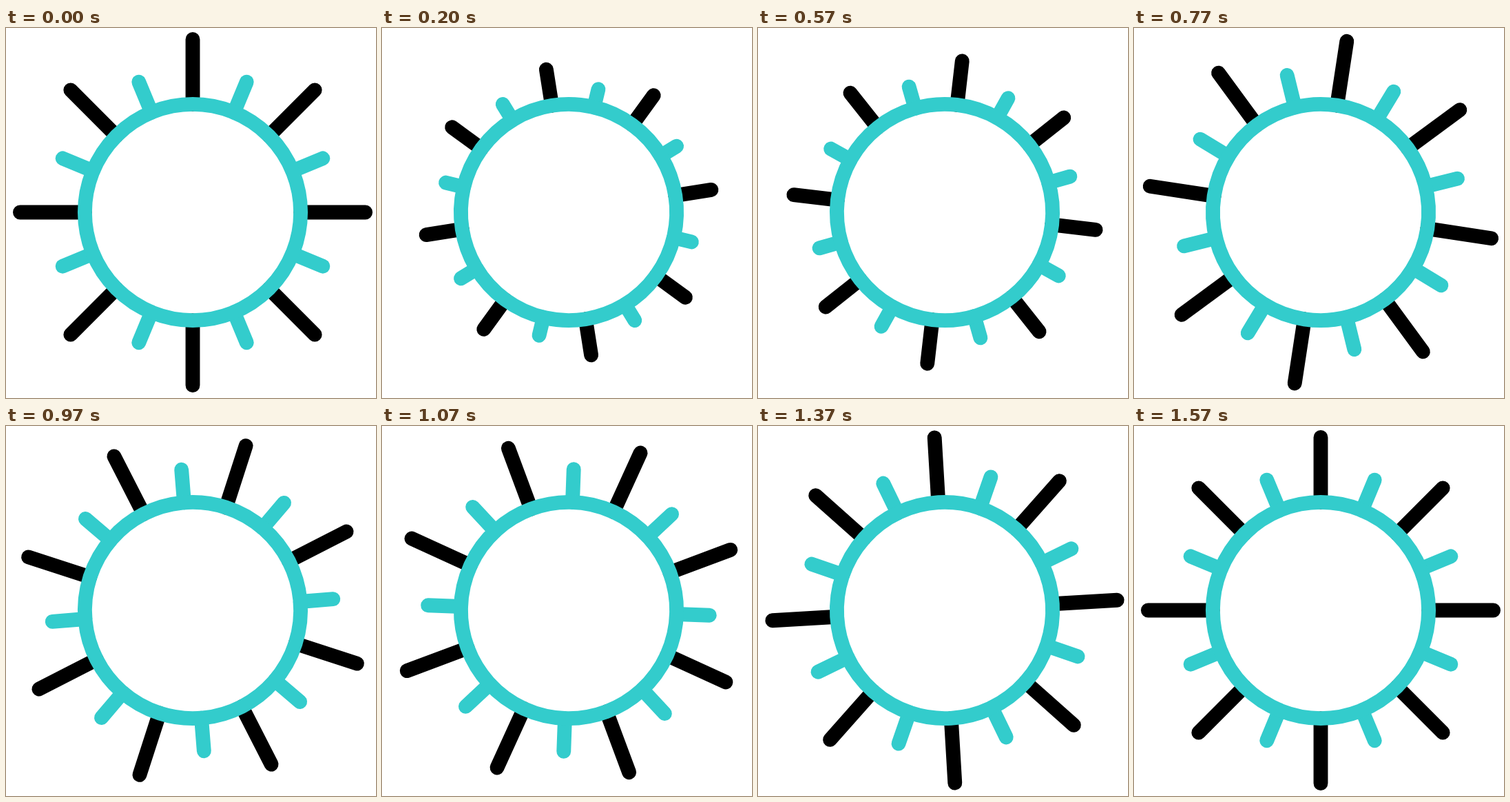
Write an HTML page with a canvas that moves like this. It is 537 by 536 pixels and loops after 1670 ms.

```html
<!DOCTYPE html>
<html lang="en">
<head>
<meta charset="utf-8">
<title>Turning sun</title>
<style>
html, body { margin: 0; overflow: hidden; background: #fff; }
canvas { display: block; }
</style>
</head>
<body>
<canvas id="stage" width="537" height="536"></canvas>
<script>
const ctx = document.getElementById('stage').getContext('2d');
const LOOP = 1670, STEP = 33.4, LAST = 47;
const TEAL = '#33cccc', UNIT = 20.88, RING = 7.5;

// cubic-bezier(.42, 0, .58, 1)
function ease(x) {
  let low = 0, high = 1;
  for (let i = 0; i < 24; i++) {
    const u = (low + high) / 2;
    if (u * (1.26 + u * (0.52 * u - 0.78)) < x) low = u; else high = u;
  }
  return low * low * (3 - 2 * low);
}

// Eased value between [step, value] keys
function track(step, keys) {
  for (let i = 1; i < keys.length; i++) {
    const [a, from] = keys[i - 1], [b, to] = keys[i];
    if (step < b) return from + (to - from) * ease((step - a) / (b - a));
  }
  return keys[keys.length - 1][1];
}

const turn = [[0, 0], [18, -38.65], [LAST, 0]];
const stretch = [[0, 1], [11, 0.243], [22, 1]];

function rays(color, length, offset) {
  ctx.strokeStyle = color;
  ctx.beginPath();
  for (let i = 0; i < 8; i++) {
    const angle = i * Math.PI / 4 + offset;
    const x = Math.cos(angle), y = Math.sin(angle), tip = RING + length;
    ctx.moveTo(x * RING, y * RING);
    ctx.lineTo(x * tip, y * tip);
  }
  ctx.stroke();
}

function draw(now) {
  const step = Math.min(LAST, Math.floor((now % LOOP + 5) / STEP));
  const scale = track(step, stretch);
  ctx.setTransform(1, 0, 0, 1, 0, 0);
  ctx.fillStyle = '#fff';
  ctx.fillRect(0, 0, 537, 536);
  ctx.translate(271, 267);
  ctx.scale(UNIT, UNIT);
  ctx.rotate(track(step, turn) * Math.PI / 180);
  ctx.lineWidth = 1;
  ctx.lineCap = 'round';
  rays('#000', 4.5 * scale, 0);
  rays(TEAL, 2.29 * scale, Math.PI / 8);
  ctx.beginPath();
  ctx.arc(0, 0, RING, 0, 2 * Math.PI);
  ctx.stroke();
}

let start;
function tick(now) {
  start ??= now;
  draw(now - start);
  requestAnimationFrame(tick);
}
draw(0);
requestAnimationFrame(tick);
</script>
</body>
</html>
```
